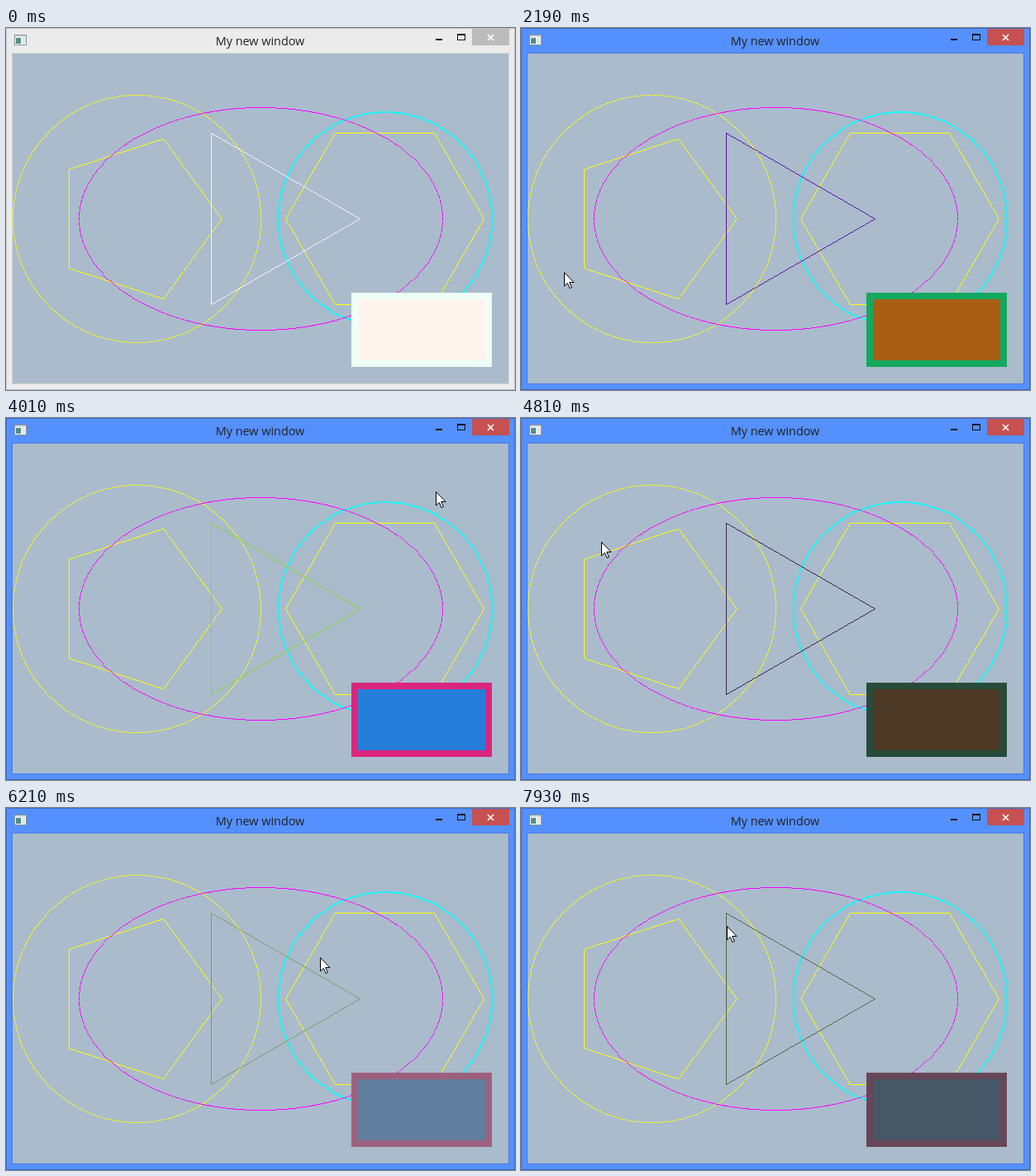
An HTML page for the animation above (8 s loop, 616x439 px).

```html
<!DOCTYPE html>
<html lang="en">
<head>
<meta charset="utf-8">
<title>My new window</title>
<style>
  html, body { margin: 0; width: 100%; height: 100%; overflow: hidden; }
  svg { display: block; width: 616px; height: 439px; }
  .crisp { shape-rendering: crispEdges; }
</style>
</head>
<body>
<svg viewBox="0 0 616 439">
  <rect id="frame" class="crisp" x=".5" y=".5" width="615" height="438"/>
  <g class="crisp">
    <rect x="10.5" y="8.5" width="14" height="12" fill="#f6f6f6" stroke="#8b9499"/>
    <rect x="11" y="9" width="13" height="2" fill="#d5dade"/>
    <rect x="12" y="12" width="6" height="7" fill="#4f9088"/>
    <rect x="20" y="12" width="3" height="7" fill="#dfe3e5"/>
  </g>
  <text x="307.5" y="21" text-anchor="middle" font-family="'Open Sans', 'Noto Sans', sans-serif" font-size="14.4" fill="#222">My new window</text>
  <g class="crisp" fill="#111">
    <rect x="520" y="13" width="8" height="2"/>
    <path fill-rule="evenodd" d="M546 7h10v8h-10zM547 9v5h8v-5z"/>
  </g>
  <rect id="close" class="crisp" x="564" y="1" width="45" height="20"/>
  <path d="M583 8l7 7m0-7l-7 7" stroke="#fff" stroke-width="1.7"/>
  <rect id="edge" class="crisp" x="7.5" y="30.5" width="601" height="401" fill="none"/>
  <rect x="8" y="31" width="600" height="400" fill="#aabbcc"/>

  <g class="crisp">
    <path id="ring" fill="#ff0"/>
    <path id="dots" fill="#0ff"/>
    <path id="penta" fill="#ff0"/>
    <path id="hexa" fill="#ff0"/>
    <path id="oval" fill="#f0f"/>
    <path id="tri"/>
    <rect id="box" x="422" y="325" width="162" height="82" stroke-width="8"/>
  </g>
  <path id="cursor" d="M.5 .5V17L4.3 13.4L7 19.6L9.4 18.6L6.7 12.5H12Z" fill="#fff" stroke="#000"/>
</svg>
<script>
const LOOP = 8000, ENTER = 170, ACTIVATE = 470, MID = 231;
const CLIENT = { x: 8, y: 31, w: 600, h: 400 };
const START_COLOR = [255, 245, 238];

// Turning points of the pointer: time, x, y
const PATH = [
  [470, 520, 285], [1690, 190, 393], [2190, 52, 296], [2990, 265, 56],
  [4010, 520, 89], [4310, 390, 55], [4810, 97, 150], [5610, 472, 210],
  [6830, 223, 120], [7130, 165, 76], [7630, 84, 185], [7930, 249, 143]
];

const $ = id => document.getElementById(id);
const set = (id, attrs) => {
  for (const key in attrs) $(id).setAttribute(key, attrs[key]);
};
const rgb = (...c) => `rgb(${c.map(Math.round)})`;

// n points evenly spread on an ellipse
const around = (n, cx, rx, ry = rx) => Array.from({ length: n }, (_, i) => {
  const a = 2 * Math.PI * i / n;
  return [cx + rx * Math.cos(a), MID - ry * Math.sin(a)];
});

// Unaliased square dots
function plot(id, points, size = 1) {
  const at = v => Math.round(v - (size - 1) / 2);
  const d = points.map(([x, y]) => `M${at(x)} ${at(y)}h${size}v${size}h${-size}z`);
  set(id, { d: d.join('') });
}

// Closed outline, one pixel per step along the longer axis
function outline(id, corners) {
  const pixels = corners.flatMap(([x, y], i) => {
    const [ex, ey] = corners[(i + 1) % corners.length];
    const dx = ex - x, dy = ey - y;
    const steps = Math.max(1, Math.round(Math.max(Math.abs(dx), Math.abs(dy))));
    return Array.from({ length: steps }, (_, k) => [x + dx * k / steps, y + dy * k / steps]);
  });
  plot(id, pixels);
}

// Screen updates come every 100 ms, 20 ms late about every 25th time
const updateTime = i => 70 + 100 * i + 20 * Math.floor((i + 12.6) / 25.5);

function snap(t) {
  let i = 0;
  while (updateTime(i) <= t) i++;
  return i ? updateTime(i - 1) : 0;
}

// Tangent that is flat at turning points, so the curve never overshoots
function tangent(i, k) {
  if (!i || i === PATH.length - 1) return 0;
  const slope = j => (PATH[j + 1][k] - PATH[j][k]) / (PATH[j + 1][0] - PATH[j][0]);
  const a = slope(i - 1), b = slope(i);
  return a * b > 0 ? 2 * a * b / (a + b) : 0;
}

function pointer(t) {
  let i = 0;
  while (i < PATH.length - 2 && t >= PATH[i + 1][0]) i++;
  const p = PATH[i], q = PATH[i + 1], d = q[0] - p[0];
  const u = Math.max(0, Math.min(1, (t - p[0]) / d)), v = 1 - u;
  return [1, 2].map(k => Math.round(
    v * v * (1 + 2 * u) * p[k] + u * u * (3 - 2 * u) * q[k] +
    u * v * d * (v * tangent(i, k) - u * tangent(i + 1, k))));
}

function render(time) {
  const t = snap(time % LOOP), active = t >= ACTIVATE, inside = t >= ENTER;
  let [r, g, b] = START_COLOR;
  if (inside) {
    const [x, y] = pointer(t);
    r = 255 * (y - CLIENT.y) / CLIENT.h;
    b = 255 * (x - CLIENT.x) / CLIENT.w;
    g = (r + b) / 2;
    set('cursor', { transform: `translate(${x} ${y})` });
  }
  set('cursor', { visibility: inside ? 'visible' : 'hidden' });
  set('box', { fill: rgb(r, g, b), stroke: rgb(b, r, g) });
  set('tri', { fill: rgb(g, b, r) });
  set('frame', { fill: active ? '#5590ff' : '#ebebeb', stroke: active ? '#4071c8' : '#c3c3c3' });
  set('edge', { stroke: active ? '#4a7edf' : '#d6d6d6' });
  set('close', { fill: active ? '#c75050' : '#bcbcbc' });
}

plot('ring', around(720, 158, 150));
plot('dots', around(360, 458.5, 129.4), 2);
outline('penta', around(5, 158.6, 102.1));
outline('hexa', around(6, 458, 120));
outline('oval', around(360, 308, 220, 135));
outline('tri', around(3, 308, 120));

const begin = performance.now();
function tick() {
  render(performance.now() - begin);
  requestAnimationFrame(tick);
}
render(0);
requestAnimationFrame(tick);
</script>
</body>
</html>
```
